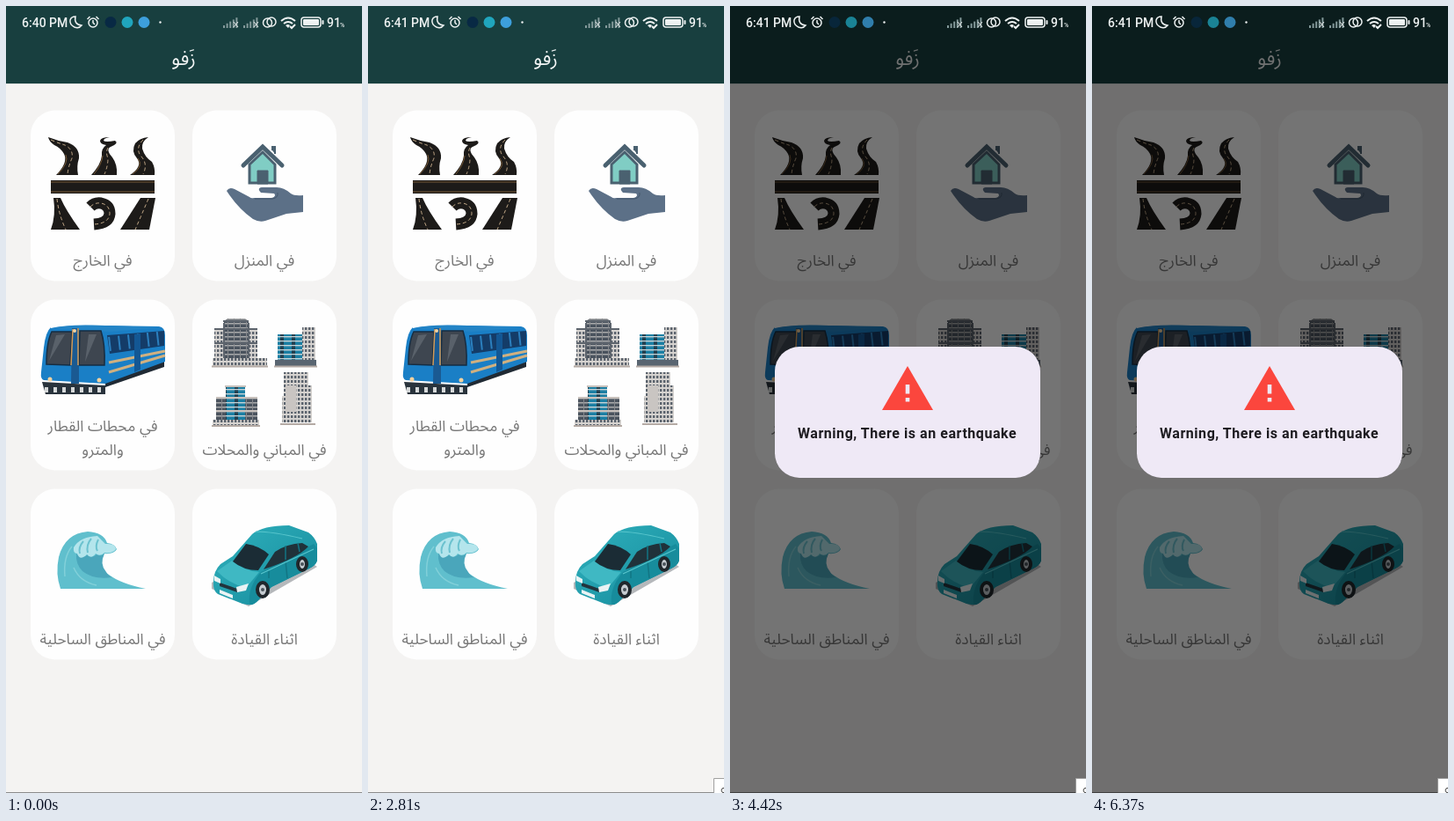
Recreate the animation shown at these times as an HTML page. Size 405 px wide and 894 px high, loop 6.57 s.

```html
<!DOCTYPE html>
<html lang="ar">
<head>
<meta charset="utf-8">
<title>Safety guide</title>
<style>
html, body { margin: 0; width: 100%; height: 100%; overflow: hidden; background: #f4f3f2; }
svg { display: block; width: 100vw; height: 100vh; }
text { font-family: Roboto, sans-serif; }
.ar { font-family: "Noto Sans Arabic", "DejaVu Sans", sans-serif; font-size: 17.3px; fill: #777; text-anchor: middle; }
.line { fill: none; }
.hidden { visibility: hidden; }
</style>
</head>
<body>
<svg viewBox="0 0 405 894">
  <defs>
    <linearGradient id="paint" x2="1" y2="1">
      <stop stop-color="#2fb1bd"/><stop offset="1" stop-color="#168a9b"/>
    </linearGradient>
    <pattern id="panes" width="4" height="5" patternUnits="userSpaceOnUse">
      <rect width="4" height="5" fill="#d6d3d0"/><rect width="2.4" height="3" fill="#5b636d"/>
    </pattern>
    <pattern id="floors" width="7" height="5" patternUnits="userSpaceOnUse">
      <rect width="7" height="5" fill="#4a535e"/><rect width="7" height="1.5" fill="#a9aaab"/>
      <rect width="1" height="5" fill="#87898d"/>
    </pattern>
    <pattern id="glass" width="13" height="5" patternUnits="userSpaceOnUse">
      <rect width="13" height="5" fill="#1c7fa3"/><rect width="13" height="1.4" fill="#c9d4d7"/>
      <rect width="4" height="5" y="1.4" fill="#25404f"/>
    </pattern>
  </defs>

  <rect width="405" height="894" fill="#f4f3f2"/>
  <rect y="88" width="405" height="1" fill="#d9dddc"/>
  <rect width="405" height="88" fill="#183f3f"/>
  <text class="ar" x="202" y="67" style="font-size:22px;fill:#f2f5f5">زَفو</text>
  <g id="cards" fill="#fefefe"></g>

  <!-- roads -->
  <g fill="#1d1b19">
    <path d="M48 149Q58 153 70 155 84 160 83 173 80 182 82 192H57Q71 178 66 168 62 161 55 158 49 154 48 149z"/>
    <path d="M118 149Q111 150 111 153 113 155 124 153 129 156 119 160 113 163 121 172 127 180 126 192H97Q108 180 109 170 108 162 114 158 107 157 107 153 108 149 118 149z"/>
    <path d="M162 149Q154 154 155 162 158 172 166 177 170 184 169 192H141Q156 182 149 173 142 165 147 156 152 150 162 149z"/>
    <path d="M51 198h118v15H51z"/>
    <path d="M54 218h8q6 14 22 36H51q6-16 3-36z"/>
    <path d="M153 218h17l-7 36h-33z"/>
    <path class="line" d="M96 228q5-5 12-4 10 2 10 12-1 11-18 12" stroke="#1d1b19" stroke-width="13"/>
    <path class="line" stroke="#d2b692" stroke-width=".9" stroke-dasharray="4 3"
      d="M51 152q9 4 16 6 10 5 8 15-4 9-5 18M116 161q-3 5 0 12 0 9-4 18M156 152q-9 9-3 18 9 9 3 21M58 219q2 18 10 35M96 228q5-5 12-4 10 2 10 12-1 11-18 12M162 219l-15 35"/>
    <path class="line" stroke="#9b7242" stroke-width=".7" d="M51 200h118M51 211h118M59 191q13-13 9-22M100 191q9-11 10-21M144 191q13-9 6-18"/>
  </g>

  <!-- house on a hand -->
  <g stroke="#4a6170">
    <path d="M277 180l15-14 14 14v21h-29z" fill="#80cdc4" stroke-width="3"/>
    <path d="M303 164v-4h3v8" fill="#4a6170" stroke-width="2"/>
    <path class="line" d="M270 181l22-21 22 21" stroke-width="5" stroke-linecap="round"/>
    <path d="M286 187h12v15h-12z" fill="#4a6170"/>
  </g>
  <path d="M251 210q3-5 9-2l17 9q2 2 5 1h20q6-2 3-5l-15-1q-5-5 1-6h17q8 0 16 7 4 3 14 2v19l-19 2-24 8q-7 2-14-2-17-12-30-32z" fill="#5c7087"/>
  <path class="line" d="M283 219h20q7-1 6-7" stroke="#43576d"/>

  <!-- train -->
  <path d="M41 427l72 4v10H45z" fill="#29333c"/>
  <path d="M113 425l67-23v8l-67 23z" fill="#202a34"/>
  <path d="M51 366q20-5 61-3l62 1q7 1 7 10v30l-68 25-70-4q-4-1-3-9l3-28q2-18 8-23z" fill="#1a7fc6"/>
  <path d="M53 366q20-4 61-3l61 2-57 5z" fill="#2384c6"/>
  <path d="M52 370h23l-2 38-27-1q0-25 6-37zM84 369h24q5 15 4 39H83z" fill="#3e4650" stroke="#162d42" stroke-width="1.500"/>
  <path d="M57 374l10-1-18 30zM94 373h9l-13 31z" fill="#59616a"/>
  <path d="M75 366h8v63h-9z" fill="#1a5a92"/>
  <path class="line" d="M76 367l-2 41M82 366v42" stroke="#d49a55" stroke-width="1.500"/>
  <path d="M115 374l65-5v17l-62 9z" fill="#143c68"/>
  <path class="line" d="M117 384l62-7" stroke="#2b7fbe" stroke-width="16" stroke-dasharray="2 9"/>
  <path class="line" d="M117 405l64-13M117 416l64-19" stroke="#d0b080" stroke-width="3"/>
  <path d="M146 373l7-1v41l-7 3z" fill="#135794"/>
  <path class="line" d="M44 436h67" stroke="#d5d8d9" stroke-width="6" stroke-dasharray="4 6"/>
  <g fill="#f2d2a0"><circle cx="50" cy="424" r="2.500"/><circle cx="106" cy="425" r="2.500"/><circle cx="78" cy="369" r="2"/></g>

  <!-- buildings -->
  <path d="M237 367h49v42h-49z" fill="url(#panes)"/>
  <path d="M248 404v-46l4-3h20l4 3v46z" fill="url(#floors)"/>
  <path class="line" d="M248 360v44M276 360v44M237 367h49M247 358h29M237 383h49" stroke="#5d646d" stroke-width="2"/>
  <path d="M235 400h62v9h-62z" fill="url(#panes)"/>
  <path d="M309 373h28v32h-28z" fill="url(#glass)"/>
  <path d="M337 365h15v42h-15z" fill="url(#panes)"/>
  <path d="M306 402h47v7h-47z" fill="#596571"/>
  <path d="M239 444h47v32h-47z" fill="url(#floors)"/>
  <path d="M250 432h22v44h-22z" fill="url(#glass)"/>
  <path class="line" d="M239 445h47M249 432h24M239 460h47" stroke="#c8c1bc" stroke-width="2"/>
  <path d="M235 470h53v7h-53z" fill="url(#panes)"/>
  <path d="M316 416h28v15h4v42h-34v-30h2z" fill="url(#panes)"/>
  <path d="M318 431h12v30h-12z" fill="#c9c5c2"/>
  <path class="line" d="M234 409.500h64M305 409.500h49M234 477h55M312 475h40" stroke="#b4aaa4" stroke-width="2"/>

  <!-- wave -->
  <path d="M62 662Q56 645 60 626 67 599 93 597 111 598 115 610 124 611 126 617 123 623 112 622 104 637 117 646 130 656 159 662z" fill="#60bfcd"/>
  <path d="M80 622q7 7 13 1 5 5 10 0 5 3 9-1-6 12 2 21 2 4 7 6-22 3-34-7-8-8-7-20z" fill="#4aa6bb"/>
  <path d="M77 615q7-12 27-13l9 9q12-1 12 6-3 5-13 4-5 5-10 1-5 7-10 1-8 8-11-1-5 0-4-7z" fill="#b4e5ec"/>
  <path class="line" d="M88 608q-6 7-4 14M97 605q-6 7-4 16M105 606q-4 8-1 13" stroke="#6cc2cf" stroke-width="2"/>
  <path class="line" d="M67 648q-2-22 8-34M77 638q7 16 26 20" stroke="#82d0d9" stroke-width="1.500"/>

  <!-- car -->
  <path d="M234 655v7l42 20 78-45-12-8-97 20z" fill="#b5b8bb"/>
  <path d="M236 654q0-12 8-20l14-9 22-25q12-10 42-10l22 8q7 5 10 13v19q-2 6-9 9l-43 21-17 17q-5 5-16 2l-28-11q-6-4-5-14z" fill="url(#paint)"/>
  <path d="M290 643l60-32 4 5v14q-2 6-9 9l-43 21-17 17q-5 5-8 2-2-19 13-36z" fill="#178c9c"/>
  <path d="M240 642l17-12q14 12 31 13l-15 18q-20-5-33-19z" fill="#3fb8c3"/>
  <path d="M258 631l15-20q15 2 26 12l-12 18q-17 0-29-10z" fill="#1b2c35"/>
  <path d="M293 640l13-20q13-9 31-10l7 4q-12 13-51 26z" fill="#20323a"/>
  <path class="line" d="M318 613v16M332 610l2 10M318 630l2 20M299 642v8" stroke="#127584" stroke-width="1.500"/>
  <path class="line" d="M284 597q20 0 53 8M290 645l60-28" stroke="#58c6cd" stroke-width="1.200"/>
  <path d="M243 655l20 7v4l-20-7z" fill="#22343d"/>
  <path d="M237 647l7 4v5l-7-3zM262 660l14-4-3 8-10 2zM243 663l15 6v4l-15-6z" fill="#eaf3f4"/>
  <g fill="#c5cbd0" stroke="#20272c" stroke-width="4">
    <ellipse cx="292" cy="663" rx="6" ry="8"/><ellipse cx="337" cy="634" rx="5" ry="7"/>
  </g>
  <g fill="#4b545b"><circle cx="292" cy="663" r="2"/><circle cx="337" cy="634" r="2"/></g>

  <g id="labels"></g>
  <path d="M0 893.500h405" stroke="#8c8c8c"/>
  <rect id="dim" width="405" height="894" opacity=".54"/>

  <!-- status bar -->
  <g fill="#eef2f2">
    <text id="clock" x="18" y="23.500" font-size="14" font-weight="500"></text>
    <g class="line" stroke="#eef2f2" stroke-width="1.500">
      <path d="M79 12q-2 9 7 10-3 4-8 2-6-3-5-8 1-4 6-4z"/>
      <circle cx="99" cy="19" r="5"/><path d="M99 16v3l2 2M92.500 15l3-3M105.500 15l-3-3"/>
      <circle cx="297.500" cy="19" r="5"/><circle cx="302" cy="18" r="5"/>
      <path d="M313 17q8-7 16 0M316 20q5-4 10 0M323 23l2 2 4-4" stroke-width="2"/>
      <rect x="336" y="13" width="22" height="11" rx="3"/>
    </g>
    <path d="M318 22q3-2 5 0l-2 3z"/>
    <rect x="338" y="15" width="18" height="7" rx="1"/><rect x="359.500" y="16" width="2" height="5" rx="1"/>
    <g id="bars" fill="#83999a"></g>
    <text x="365" y="23.500" font-size="14" font-weight="500">91</text>
    <text x="380" y="23.500" font-size="7" font-weight="500">%</text>
    <circle cx="175.500" cy="18.500" r="1.200"/>
    <g id="badges">
      <circle cx="119" cy="18.500" r="6.500" fill="#082944"/>
      <circle cx="138" cy="18.500" r="6.500" fill="#20a5bd"/>
      <circle cx="157" cy="18.500" r="6.500" fill="#3d9fdc"/>
    </g>
  </g>

  <g id="alert">
    <rect x="51" y="387" width="302" height="149" rx="28" fill="#efe9f6"/>
    <path d="M202 409l29 50h-58z" fill="#fb463d"/>
    <path d="M199.700 430h4.600v10.500h-4.600zM199.700 445h4.600v4.500h-4.600z" fill="#efe9f6"/>
    <text x="77" y="491" font-size="16" font-weight="700" letter-spacing=".55" fill="#1d1b20">Warning, There is an earthquake</text>
  </g>
  <g id="corner">
    <path d="M393.500 895v-17.500H406V895z" fill="#fff" stroke="#a0a0a0"/>
    <path class="line" d="M406 888q-4 0-4 3t4 3" stroke="#444"/>
  </g>
</svg>
<script>
const LOOP = 6570, MINUTE_AT = 1620, CORNER_AT = 2320, ALERT_AT = 4420;
const $ = id => document.getElementById(id);

for (const y of [118.5, 333.5, 548.5])
  for (const x of [28, 212])
    $('cards').innerHTML += `<rect x="${x}" y="${y}" width="164" height="194" rx="28"/>`;

const labels = [
  [110, 295, 'في الخارج'], [294, 295, 'في المنزل'],
  [110, 483, 'في محطات القطار'], [110, 510, 'والمترو'],
  [294, 510, 'في المباني والمحلات'],
  [110, 725, 'في المناطق الساحلية'], [294, 725, 'اثناء القيادة']
];
$('labels').innerHTML = labels.map(([x, y, s]) => `<text class="ar" x="${x}" y="${y}">${s}</text>`).join('');

for (const x of [247, 270]) {
  for (let i = 0; i < 5; i++)
    $('bars').innerHTML += `<rect x="${x + i * 3.6}" y="${22 - i * 2.2}" width="2" height="${3 + i * 2.2}"/>`;
  $('bars').innerHTML += `<path d="M${x + 12} 18l5 6m0-6l-5 6" stroke="#eef2f2"/>`;
}

const show = (id, on) => $(id).classList.toggle('hidden', !on);

function draw() {
  const t = performance.now() % LOOP, alert = t >= ALERT_AT;
  $('clock').textContent = t < MINUTE_AT ? '6:40 PM' : '6:41 PM';
  show('corner', t >= CORNER_AT);
  show('dim', alert);
  show('alert', alert);
  $('badges').setAttribute('opacity', alert ? .75 : 1);
  requestAnimationFrame(draw);
}
draw();
</script>
</body>
</html>
```
